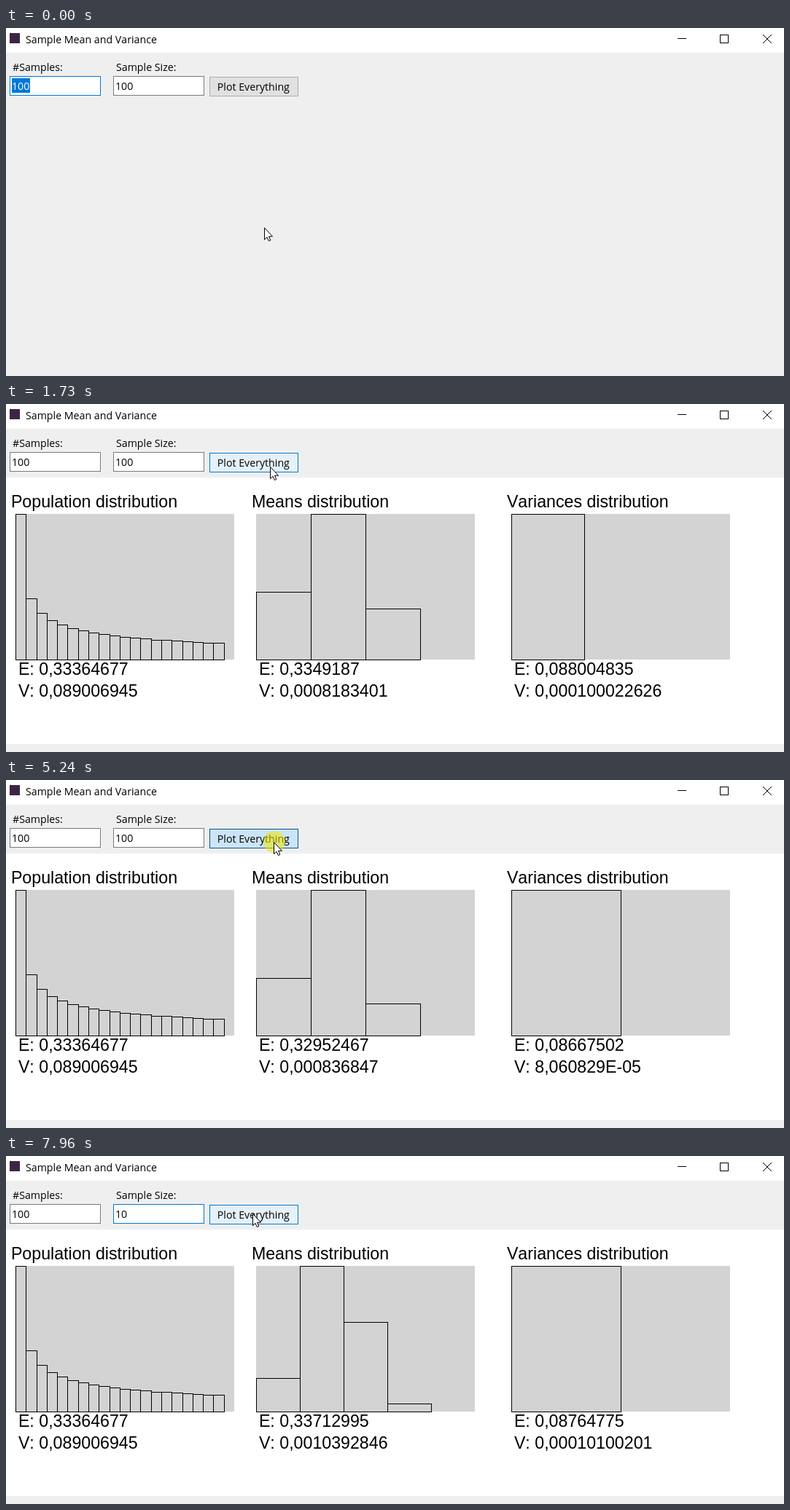
These frames come from a looping animation (1067 by 478 pixels, 8000 ms). An HTML page with a canvas:

```html
<!DOCTYPE html>
<html lang="en">
<head>
<meta charset="utf-8">
<title>Sample Mean and Variance</title>
<style>
  html, body { margin: 0; width: 100%; height: 100%; overflow: hidden; background: #efefef; }
  canvas { display: block; width: 1067px; height: 478px; }
</style>
</head>
<body>
<canvas id="stage" width="1067" height="478"></canvas>
<script>
const ctx = document.getElementById('stage').getContext('2d');
const LOOP = 8000;
const STEP = 80;    // pointer refresh and length of a mouse press
const BLINK = 530;  // caret half period
const UI = '14.2px "Open Sans", "Noto Sans", sans-serif';
const PLOT = '23.2px "Liberation Sans", Arial, sans-serif';
const BLUE = '#0078d7';

const box1 = { x: 5, y: 66, w: 125, h: 27 };
const box2 = { x: 147, y: 66, w: 125, h: 27 };
const button = { x: 279, y: 67, w: 122, h: 27 };

const focus1 = 830;
const focus2 = 6220;
const erase = 7220;

const start = { x: 354, y: 274 };
const moves = [
  { from: 80, to: 750, x: 47, y: 81 },
  { from: 990, to: 1550, x: 362, y: 86 },
  { from: 1810, to: 2060, x: 367, y: 85 },
  { from: 5480, to: 5980, x: 218, y: 89 },
  { from: 6060, to: 6140, x: 202, y: 86 },
  { from: 6810, to: 7050, x: 207, y: 86 },
  { from: 7480, to: 7960, x: 338, y: 79 }
];

// Bar height rules, relative to the tallest bar
const root = i => 1.01 * (Math.sqrt(i + 1) - Math.sqrt(i));
const bell = (peak, spread) => i => Math.exp(((1 - peak) ** 2 - (i - peak) ** 2) / (2 * spread));
const decay = rate => i => rate ** i;

const chart = (x, title) => (bins, height, e, v) => ({ x, title, bins, height, e, v });
const means = chart(343, 'Means distribution');
const variances = chart(693, 'Variances distribution');
const population = chart(13, 'Population distribution')(21, root, '0,33364677', '0,089006945');

const runs = [
  { press: 1630, charts: [means(4, bell(0.92, 0.55), '0,3349187', '0,0008183401'),
                          variances(3, decay(0), '0,088004835', '0,000100022626')] },
  { press: 2560, charts: [means(4, bell(0.97, 0.46), '0,33128453', '0,0008423517'),
                          variances(3, decay(0), '0,08816342', '0,00010417385')] },
  { press: 3480, charts: [means(4, bell(1.03, 0.39), '0,33184734', '0,0007868072'),
                          variances(3, decay(0.01), '0,08892677', '0,00011292868')] },
  { press: 4410, charts: [means(4, bell(0.88, 0.41), '0,32952467', '0,000836847'),
                          variances(2, decay(0), '0,08667502', '8,060829E-05')] },
  { press: 5240, charts: [means(5, bell(1.25, 0.51), '0,33712995', '0,0010392846'),
                          variances(2, decay(0), '0,08764775', '0,00010100201')] }
];
const presses = [focus1, focus2, ...runs.map(r => r.press)];
const firstPlot = runs[0].press + STEP;

const inside = (p, r) => p.x >= r.x && p.x < r.x + r.w && p.y >= r.y && p.y < r.y + r.h;
const ease = p => p * p * (3 - 2 * p);

function pointerAt(t) {
  let { x, y } = start;
  for (const m of moves) {
    if (t < m.from) break;
    const steps = Math.round((m.to - m.from) / STEP) + 1;
    const step = Math.floor((t - m.from) * (steps - 1) / (m.to - m.from)) + 1;
    const p = ease(Math.min(1, step / steps));
    x += (m.x - x) * p;
    y += (m.y - y) * p;
  }
  return { x: Math.round(x), y: Math.round(y) };
}

function fill(color, x, y, w, h) {
  ctx.fillStyle = color;
  ctx.fillRect(x, y, w, h);
}

function text(str, x, y, font = UI, color = '#000') {
  ctx.font = font;
  ctx.fillStyle = color;
  ctx.fillText(str, x, y);
}

function frame(r, border, face, width = 1) {
  fill(border, r.x, r.y, r.w, r.h);
  fill(face, r.x + width, r.y + width, r.w - 2 * width, r.h - 2 * width);
}

function drawWindow() {
  fill('#efefef', 0, 0, 1067, 478);
  fill('#fff', 0, 0, 1067, 34);
  fill('#3b2540', 5, 7, 14, 14);
  text('Sample Mean and Variance', 27, 21);
  fill('#000', 921, 14, 12, 1);
  ctx.strokeRect(979.5, 9.5, 11, 11);
  ctx.beginPath();
  ctx.moveTo(1038, 9);
  ctx.lineTo(1050, 21);
  ctx.moveTo(1050, 9);
  ctx.lineTo(1038, 21);
  ctx.stroke();
  text('#Samples:', 9, 59);
  text('Sample Size:', 151, 59);
}

// caretAge: time since the caret was last reset, negative for no caret
function drawField(r, value, { focused, hovered, selected, caretAge }) {
  const left = r.x + 3;
  frame(r, focused ? BLUE : hovered ? '#484848' : '#7a7a7a', '#fff');
  if (selected) fill(BLUE, left, 69, 25, 20);
  text(value, left, 85, UI, selected ? '#fff' : '#000');
  if (focused && caretAge >= 0 && caretAge % (2 * BLINK) < BLINK) {
    fill('#000', Math.floor(left + ctx.measureText(value).width), 69, 1, 20);
  }
}

function drawButton(pressed, hovered, focused) {
  if (pressed) frame(button, '#005499', '#cce4f7');
  else if (hovered) frame(button, BLUE, '#e5f1fb');
  else if (focused) frame(button, BLUE, '#e1e1e1', 2);
  else frame(button, '#adadad', '#e1e1e1');
  text('Plot Everything', 289.8, 86);
}

function drawChart({ x, title, bins, height, e, v }) {
  text(title, x - 6.1, 142, PLOT);
  fill('#d3d3d3', x, 151, 300, 200);
  const edge = i => Math.round(x + i * 300 / bins) + 0.5;
  for (let i = 0; i < bins - 1; i++) {
    const h = Math.round(200 * Math.min(1, height(i)));
    if (h) ctx.strokeRect(edge(i), 351.5 - h, edge(i + 1) - edge(i), h);
  }
  text('E: ' + e, x + 3.9, 372, PLOT);
  text('V: ' + v, x + 3.9, 402, PLOT);
}

function drawArrow({ x, y }) {
  ctx.save();
  ctx.translate(x, y);
  ctx.fillStyle = '#fff';
  const shape = new Path2D('M.5 .5V16.7L4 13.3L6.4 18.5L8.8 17.6L6.5 12.3H11.5Z');
  ctx.fill(shape);
  ctx.stroke(shape);
  ctx.restore();
}

function drawBeam({ x, y }) {
  fill('#000', x, y - 7, 1, 14);
  for (const row of [y - 8, y + 7]) {
    fill('#000', x - 3, row, 3, 1);
    fill('#000', x + 1, row, 3, 1);
  }
}

function drawGlow(x, y) {
  ctx.beginPath();
  ctx.arc(x, y, 15, 0, Math.PI * 2);
  ctx.fillStyle = 'rgba(240, 230, 0, 0.57)';
  ctx.fill();
}

function draw(t) {
  const pointer = pointerAt(t);
  const held = presses.some(p => t >= p && t < p + STEP);
  const over1 = inside(pointer, box1);
  const over2 = inside(pointer, box2);
  const overButton = inside(pointer, button);
  const beam = over1 || over2;

  ctx.fontKerning = 'none';
  ctx.strokeStyle = '#000';
  ctx.lineWidth = 1;
  drawWindow();
  drawField(box1, '100', {
    focused: t < firstPlot,
    hovered: over1,
    selected: t < focus1 + STEP,
    caretAge: t - focus1 - STEP
  });
  drawField(box2, t < erase ? '100' : '10', {
    focused: t >= focus2,
    hovered: over2,
    caretAge: t - (t < erase ? focus2 + STEP : erase)
  });
  drawButton(held && overButton, overButton, t >= firstPlot && t < focus2);

  const run = runs.filter(r => t >= r.press + STEP).pop();
  if (run) {
    fill('#fff', 0, 101, 1067, 366);
    [population, ...run.charts].forEach(drawChart);
  }

  if (held) drawGlow(pointer.x + (beam ? 0 : 1), pointer.y);
  (beam ? drawBeam : drawArrow)(pointer);
}

const begin = performance.now();
function tick() {
  draw((performance.now() - begin) % LOOP);
  requestAnimationFrame(tick);
}
tick();
</script>
</body>
</html>
```
